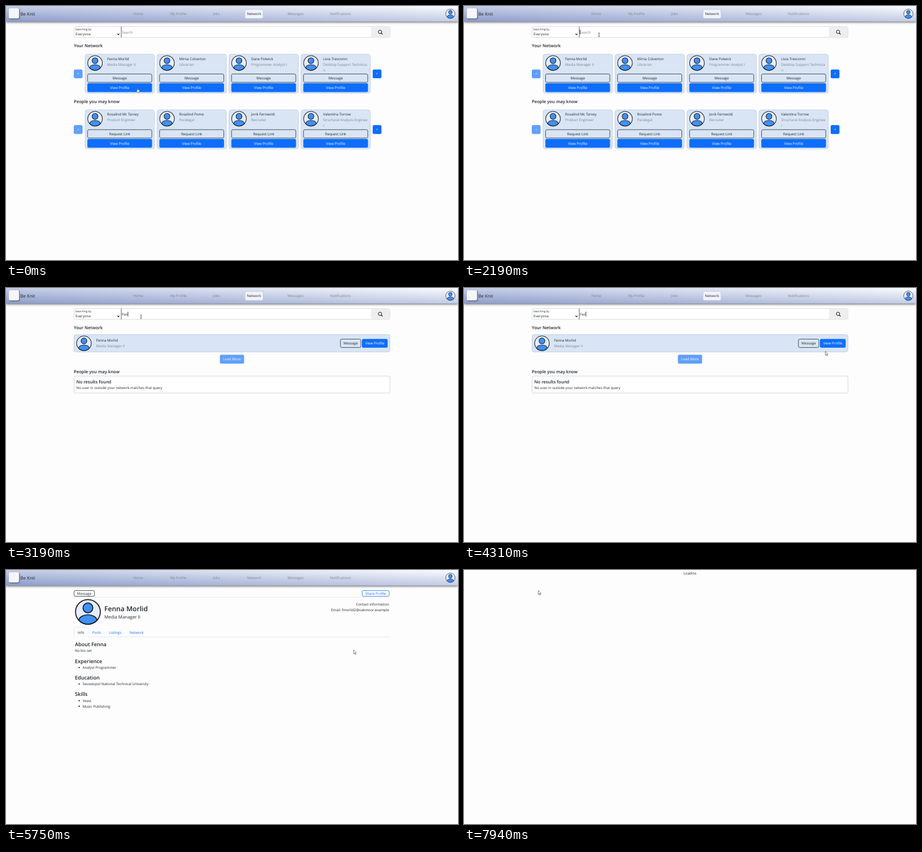
Animation, 800 px wide and 450 px high, one loop 8 s. Source, as an HTML page:

```html
<!DOCTYPE html>
<html lang="en">
<head>
<meta charset="utf-8">
<title>Network search</title>
<style>
html, body { margin: 0; height: 100%; overflow: hidden; background: #fdfdfe; }
svg { display: block; width: 100vw; height: 100vh; }
text { font: 6.25px "Open Sans", "Noto Sans", sans-serif; fill: #212529; text-rendering: geometricPrecision; white-space: pre; }
.mid { text-anchor: middle; }
.end { text-anchor: end; }
.mute { fill: #7c838d; }
.white { fill: #fff; }
.blue { fill: #0d6efd; }
.tiny { font-size: 4.8px; }
.lead { font-size: 7.9px; }
.h3 { font-size: 7.7px; font-weight: 600; }
.h2 { font-size: 9.1px; font-weight: 600; }
.h1 { font-size: 12.1px; font-weight: 600; }
.nav { filter: drop-shadow(0 1px 2px #000a); }
.logo { filter: drop-shadow(1px 1px 1px #0008); }
</style>
</head>
<body>
<svg id="stage" viewBox="0 0 800 450">
  <defs>
    <linearGradient id="sky" x1="0" y1="1" x2="1" y2="0">
      <stop stop-color="#8c9dcb"/><stop offset="1" stop-color="#fbfcff"/>
    </linearGradient>
    <g id="person" stroke="#14181f" stroke-width="1.7">
      <circle r="21.6" fill="#e6ecfb"/>
      <path d="M-16 14.5C-13 1.8 13 1.8 16 14.5A21.6 21.6 0 0 1-16 14.5Z" fill="#3f90fb"/>
      <circle cy="-7" r="8.6" fill="#3f90fb"/>
    </g>
  </defs>
</svg>
<script>
const LOOP = 8000, BLUE = '#0d6efd', DARK = '#212529';
const stage = document.getElementById('stage');

const text = (x, y, s, cls = '') => `<text x="${x}" y="${y}" class="${cls}">${s}</text>`;
const box = (x, y, w, h, fill, stroke = 'none', r = 2.5) =>
  `<rect x="${x}" y="${y}" width="${w}" height="${h}" rx="${r}" fill="${fill}" stroke="${stroke}" stroke-width=".8"/>`;
const line = (d, color, width = .8) => `<path d="${d}" fill="none" stroke="${color}" stroke-width="${width}"/>`;
const avatar = (x, y, r) => `<use href="#person" transform="translate(${x} ${y}) scale(${r / 22})"/>`;
const solid = (x, y, w, label, off) => `<g opacity="${off ? .65 : 1}">` +
  box(x, y, w, 15.6, BLUE) + text(x + w / 2, y + 10, label, 'mid white') + '</g>';
const outline = (x, y, w, label, h = 15.2, color = DARK, cls = '') =>
  box(x + .4, y + .4, w - .8, h - .4, 'none', color) + text(x + w / 2, y + h / 2 + 2.4, label, 'mid ' + cls);
const group = (id, body) => `<g id="${id}">${body}</g>`;

const hero = ['Fenna Morlid', 'Media Manager II'];
const network = [hero, ['Mirna Colverton', 'Librarian'], ['Dane Polwick', 'Programmer Analyst I'],
  ['Livia Tresconni', 'Desktop Support Technicia', 'n']];
const others = [['Rosalind Mc Tarvey', 'Product Engineer'], ['Rosalind Pome', 'Paralegal'],
  ['Jorik Fernwold', 'Recruiter'], ['Valentina Torrow', 'Structural Analysis Enginee', 'r']];
const matches = [['Noelle Wintergrove', 'Structural Engineer'], ['Clint Darwold', 'Compensation Analyst'],
  ['Marietta Stonefold', 'Community Outreach Specialist'], ['Brenda Ostel', 'Pharmacist']];

function navBar(active) {
  const items = [['Home', 234], ['My Profile', 305], ['Jobs', 372.5], ['Network', 439], ['Messages', 512.5], ['Notifications', 592]];
  return `<rect class="nav" width="800" height="27.5" fill="url(#sky)"/>` +
    '<rect class="logo" x="5" y="4" width="18" height="18" rx="2.5" fill="#f4f6fb"/>' +
    text(25.5, 17, 'Be Knit', 'lead') +
    (active ? box(423, 6, 32, 16, '#f1f3fa', '#bcc4d8') : '') +
    items.map(([s, x]) => text(x, 16.2, s, 'mid' + (active && s === 'Network' ? '' : ' mute'))).join('') +
    avatar(786.5, 13.7, 8.4);
}

const searchBar = box(120.4, 36.4, 559.2, 19.4, '#fff', '#cfd2d8', 3) +
  box(646, 36.8, 33.2, 18.6, '#eeeeef') +
  text(122.5, 43.4, 'Searching by', 'tiny') + text(123, 52.2, 'Everyone') +
  line('M197.2 49.2l1.8 1.8 1.8-1.8', '#111', 1.1) + line('M204 36.5V55.8', '#333') +
  '<circle cx="662" cy="45.8" r="3" fill="none" stroke="#111"/>' + line('M664.2 48l2.4 2.4', '#111', 1.1);

function cardRow(y, title, people, action) {
  const cards = people.map(([name, job, rest = ''], i) => {
    const x = 139.6 + i * 127.4;
    return box(x + .4, y + .4, 122.6, 69, '#d9e5f5', '#b9c8de', 4) + avatar(x + 18, y + 16, 13.2) +
      text(x + 39.5, y + 10.5, name) + text(x + 39.5, y + 20.5, job, 'mute') + text(x + 39.5, y + 30.5, rest, 'mute') +
      outline(x + 4.4, y + 35, 114.5, action) + solid(x + 4.4, y + 51.8, 114.5, 'View Profile');
  });
  return text(120, y - 12, title, 'h3') + cards.join('') +
    solid(120, y + 27.4, 15.5, '&lt;', true) + solid(649, y + 27.4, 15.5, '&gt;');
}

function resultRows(y, people, action, w, done) {
  const rows = people.map(([name, job], i) => {
    const top = y + i * 36.65;
    return box(120.4, top + .4, 559.2, 30.6, '#d9e5f5', '#b9c8de', 3.5) + avatar(138, top + 15.7, 13.2) +
      text(159.5, top + 13.2, name) + text(159.5, top + 23.2, job, 'mute') +
      outline(628.5 - w, top + 8, w, action) + solid(630, top + 8, 45.5, 'View Profile');
  });
  return rows.join('') + solid(378.6, y + people.length * 36.65 - .5, 42.8, 'Load More', done);
}

function results(mine, found) {
  const y = 113.9 + mine.length * 36.65;
  return text(120, 73, 'Your Network', 'h3') + resultRows(82.2, mine, 'Message', 37, mine.length < 4) +
    text(120, y, 'People you may know', 'h3') +
    (found ? resultRows(y + 6, found, 'Request Link', 48)
      : box(120.4, y + 5.5, 559.2, 30, '#fff', '#c6cad1') + text(124.5, y + 18.3, 'No results found', 'h3') +
        text(124.5, y + 28.8, 'No user in outside your network matches that query'));
}

function profile() {
  const bullet = (y, s) => `<circle cx="129.5" cy="${y - 2.2}" r="1.1"/>` + text(135.5, y, s);
  return outline(120, 36, 37, 'Message', 10.6) +
    outline(630, 36, 48.5, 'Share Profile', 10.6, BLUE, 'blue') + line('M120 48.7H680', '#e2e4e9') +
    avatar(145, 74.2, 22.3) + text(174, 73.4, hero[0], 'h1') + text(174, 85.6, hero[1], 'lead') +
    text(678, 63, 'Contact information', 'end') + text(678, 73, 'Email: fmorlid2@oakmoor.example', 'end') +
    line('M120 118.6H120.4V104.5Q120.4 101.5 123.4 101.5H143Q146 101.5 146 104.5V118.6H680', '#dee2e6') +
    text(132.7, 112.6, 'Info', 'mid') +
    [['Posts', 160.5], ['Listings', 193], ['Network', 231]].map(([s, x]) => text(x, 112.6, s, 'mid blue')).join('') +
    text(122, 135, 'About Fenna', 'h2') + text(122, 145.4, 'No bio set') +
    text(122, 164.5, 'Experience', 'h2') + bullet(175, 'Analyst Programmer') +
    text(122, 194, 'Education', 'h2') + bullet(204.2, 'Sevastopol National Technical University') +
    text(122, 223.4, 'Skills', 'h2') + bullet(233.8, 'Yeast') + bullet(243.6, 'Music Publishing');
}

const scenes = {
  cards: cardRow(85, 'Your Network', network, 'Message') + cardRow(183.7, 'People you may know', others, 'Request Link'),
  many: results(network, matches),
  few: results([hero], matches),
  none: results([hero]),
  profile: navBar(false) + profile(),
  loading: text(400, 7.6, 'Loadins', 'mid')
};
const pointers = {
  arrow: '<path d="M0 0V7.2L1.7 5.7 2.8 8.2 4 7.7 2.9 5.2H5Z" fill="#fff" stroke="#333" stroke-width=".6"/>',
  beam: line('M-1.4-3H1.4M0-3V3M-1.4 3H1.4', '#222', .7),
  hand: '<path d="M-.7 0Q0-.8.7 0V2.4L3 3.1Q3.7 3.5 3.4 4.6L2.8 6.6H-.8L-2.4 4.3Q-2.2 3.4-.7 4.2Z" fill="#fff" stroke="#222" stroke-width=".5"/>'
};

const groups = set => Object.entries(set).map(([id, body]) => group(id, body)).join('');
stage.insertAdjacentHTML('beforeend',
  group('search', navBar(true) + searchBar + text(205, 48.8, '', 'mute').replace('<text', '<text id="query"') +
    '<rect id="caret" y="42" width=".8" height="8.4" fill="#111"/>') +
  groups(scenes) + group('cursor', groups(pointers)));

// Each timeline holds [start, value] pairs; the last one begun applies.
const sceneTimes = [[0, 'cards'], [2250, 'many'], [2390, 'few'], [2840, 'none'], [4940, 'loading'], [5380, 'profile'], [7810, 'loading']];
const typing = [[0, ''], [130, ''], [2250, 'F'], [2390, 'Fe'], [2840, 'Fen']];
const pointerTimes = [[0, 'hand'], [90, 'arrow'], [150, 'beam'], [3830, 'arrow'], [4400, 'hand'], [4940, 'arrow'], [7560, 'hand'], [7810, 'arrow']];
const path = [[0, 233, 146], [60, 233, 146], [190, 239, 51], [3750, 239, 51], [4310, 639.5, 112], [4500, 653, 98],
  [5380, 653, 98], [5750, 615.3, 141.5], [6190, 615.3, 141.5], [6880, 159.3, 69], [7000, 159.3, 69],
  [7380, 136, 49], [7560, 136, 49], [7630, 131.6, 36.3], [LOOP, 131.6, 36.3]];

const at = (list, t) => list.filter(([start]) => start <= t).pop();
const el = id => document.getElementById(id);
const show = (id, on) => el(id).setAttribute('visibility', on ? 'visible' : 'hidden');

function cursorAt(t) {
  const i = path.findIndex(([time]) => time > t);
  const [t0, x0, y0] = path[i - 1], [t1, x1, y1] = path[i];
  const u = (t - t0) / (t1 - t0), e = u * u * (3 - 2 * u);
  return [x0 + (x1 - x0) * e, y0 + (y1 - y0) * e];
}

function draw(now) {
  const t = now % LOOP, scene = at(sceneTimes, t)[1];
  const searching = scene !== 'profile' && scene !== 'loading';
  for (const id in scenes) show(id, id === scene);
  show('search', searching);

  const [keyTime, typed] = at(typing, t), query = el('query');
  query.textContent = typed || 'Search';
  query.setAttribute('class', typed ? '' : 'mute');
  el('caret').setAttribute('x', 204.9 + (typed ? query.getComputedTextLength() : 0));
  show('caret', searching && t >= 130 && (t - keyTime) % 1000 < 500);

  const pointer = at(pointerTimes, t)[1];
  for (const id in pointers) show(id, id === pointer);
  el('cursor').setAttribute('transform', `translate(${cursorAt(t)})`);
  requestAnimationFrame(draw);
}
requestAnimationFrame(draw);
</script>
</body>
</html>
```
